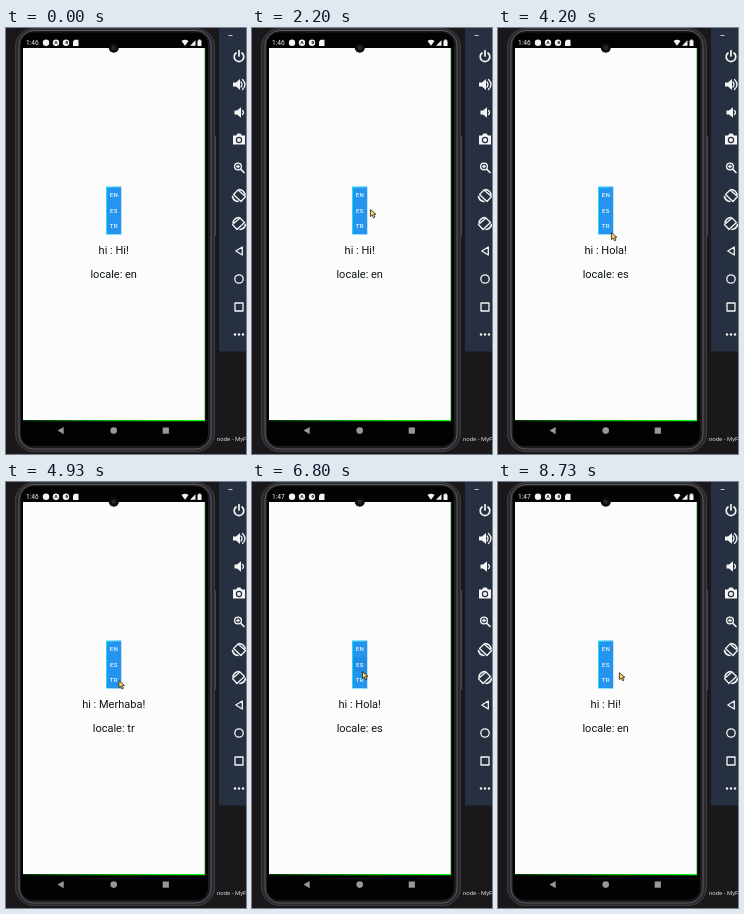
These frames come from a looping animation (240 px wide and 426 px high, 8790 ms). An HTML page:

```html
<!DOCTYPE html>
<html lang="en">
<head>
<meta charset="utf-8">
<title>Locale switcher</title>
<style>
  html, body { margin: 0; width: 100%; height: 100%; overflow: hidden; background: #1a181a; }
  svg { display: block; width: 100%; height: 100%; font-family: Roboto, sans-serif; }
  .line { fill: none; stroke: #f4f4f4; stroke-width: 1.3; stroke-linejoin: round; stroke-linecap: round; }
  .bold { stroke-width: 1.7; }
  .solid { fill: #f4f4f4; }
  .label { font-size: 11px; text-anchor: middle; fill: #0c160c; }
  .button { font-size: 6.2px; font-weight: 500; letter-spacing: .3px; text-anchor: middle; fill: #e4f4ff; }
</style>
</head>
<body>
<svg viewBox="0 0 240 426">
  <defs>
    <linearGradient id="green">
      <stop offset="0" stop-color="#063006"/>
      <stop offset=".5" stop-color="#08b008"/>
      <stop offset="1" stop-color="#08f808"/>
    </linearGradient>
    <linearGradient id="cyan">
      <stop offset="0" stop-color="#22dcf4"/>
      <stop offset="1" stop-color="#3aa6f0"/>
    </linearGradient>
  </defs>
  <rect width="240" height="426" fill="#1a181a"/>

  <!-- phone -->
  <path d="M209.500 108v100" stroke="#44444a"/>
  <rect x="9.500" y=".5" width="199" height="423" rx="18" fill="#2a2a2d" stroke="#3d3d43"/>
  <rect x="13" y="2.500" width="192" height="418.500" rx="15" fill="#1c1c1f" stroke="#5c5c65"/>
  <rect x="15" y="4.500" width="187" height="413.500" rx="12" fill="#020202"/>
  <rect x="17" y="20" width="182" height="372" fill="#fcfcfd"/>
  <rect x="17" y="392" width="182" height="1.300" fill="url(#green)"/>
  <rect x="198.500" y="20" width=".7" height="372" fill="#52b452"/>
  <circle cx="107.800" cy="19.700" r="5" fill="#0b0c0e"/>
  <circle cx="107.800" cy="19.700" r="2.200" fill="#202832"/>

  <!-- status bar -->
  <text id="clock" x="20" y="17.300" font-size="6.600" fill="#f4f4f4"></text>
  <g class="solid">
    <circle cx="40" cy="14.800" r="3.200"/>
    <circle cx="50" cy="14.800" r="3.200"/>
    <circle cx="60" cy="14.800" r="3.200"/>
    <path d="M67 13.500l1.500-1.800h4v6.200H67z"/>
    <path d="M175.500 13q3.500-2.600 7 0l-3.500 4.800z"/>
    <path d="M184 17.800l5.500-5.500v5.500z"/>
    <path d="M191.500 12.400h1v-.8h2v.8h1v5.600h-4z"/>
  </g>
  <path d="M48.700 16.100l1.300-3 1.300 3M60 13.600h1.500v1.800h-1.500z" fill="none" stroke="#111" stroke-width=".8"/>

  <!-- navigation bar -->
  <g fill="#98989a">
    <path d="M57.700 399v7.200l-6.200-3.600z"/>
    <circle cx="107.700" cy="402.600" r="3.300"/>
    <rect x="156.700" y="399.500" width="6.200" height="6.200"/>
  </g>

  <!-- app -->
  <rect x="100" y="158.500" width="15.300" height="48" fill="url(#cyan)"/>
  <rect x="101" y="160" width="14" height="46" fill="#2594ee"/>
  <rect id="ripple" x="101" width="14" height="15.500" fill="#0867bd"/>
  <g class="button">
    <text x="107.900" y="169.300">EN</text>
    <text x="107.900" y="184.900">ES</text>
    <text x="107.900" y="200.400">TR</text>
  </g>
  <text class="label" id="greeting" x="107.700" y="226.300"></text>
  <text class="label" id="locale" x="107.700" y="249.700"></text>

  <!-- emulator toolbar -->
  <rect x="213" width="27" height="323.500" fill="#263040"/>
  <path d="M222.500 7.500h4" stroke="#c5c8d0"/>
  <g class="line" transform="translate(233 0)">
    <path class="bold" d="M-3 25a4.800 4.800 0 1 0 6 0M0 22.500v5.500"/>
    <path d="M2 54q2 2.500 0 5M3.500 51.500q5 5 0 10M3.500 82.500q2 2 0 4"/>
    <circle cx="-1" cy="138.500" r="3.400"/>
    <path class="bold" d="M2 141.500l3 3"/>
    <path d="M-2.300 138.500h2.600M-1 137.200v2.600"/>
    <g id="rotate">
      <path d="M-5.500 166.500l4.500-4.500 7.500 6.500-4.500 5z"/>
      <path class="bold" d="M0 161.500q5 .5 6 5M-1 173.500q-4.500-.5-5.500-5"/>
    </g>
    <use href="#rotate" transform="translate(0 28) scale(-1 1)"/>
    <path d="M3.300 219v8l-6.500-4z"/>
    <circle cy="251" r="4.200"/>
    <rect x="-4" y="275" width="8" height="8"/>
  </g>
  <g class="solid" transform="translate(233 0)">
    <path d="M-6 54.500h3l4-3.500v11l-4-3.500h-3zM-4.500 82.500h2.500l4-3.300v10.600l-4-3.300h-2.500z"/>
    <path d="M-6 107.500h3l1.500-2h3l1.500 2h3v9H-6z"/>
    <circle cx="-4" cy="306.500" r="1.200"/>
    <circle cy="306.500" r="1.200"/>
    <circle cx="4" cy="306.500" r="1.200"/>
  </g>
  <circle cx="233" cy="112" r="2.600" fill="#f4f4f4" stroke="#263040" stroke-width="1.200"/>
  <text x="211" y="412.700" font-size="6" fill="#d2d2d6">node - MyPr</text>

  <path id="cursor" d="M.4 .6v7l1.800-1.500 1.300 2.700 1.500-.7-1.300-2.600 2.200-.2z"
        fill="#fad060" stroke="#29251b" stroke-width=".8" stroke-linejoin="round"/>
</svg>
<script>
  const LOOP = 8790;
  const CLOCK_CHANGE = 6250;
  const RIPPLE_TIME = 420;
  const greetings = { en: "Hi!", es: "Hola!", tr: "Merhaba!" };
  const buttonTops = { en: 159.5, es: 175, tr: 190.5 };
  const clicks = [[2700, "es"], [4450, "tr"], [6500, "es"], [7750, "en"]];
  // time, x, y
  const path = [
    [650, 198, 128], [1000, 143, 149], [1700, 118, 181], [2200, 118, 181],
    [2600, 111, 183], [3100, 111, 183], [3900, 113, 204], [4700, 113, 204],
    [5400, 111, 181], [5900, 111, 181], [6400, 110, 189], [6850, 110, 189],
    [7500, 111, 168], [7950, 111, 168], [8600, 121, 190], [LOOP, 121, 190]
  ];
  const byId = id => document.getElementById(id);
  const ease = p => p * p * (3 - 2 * p);

  function cursorAt(time) {
    const next = path.findIndex(point => point[0] > time);
    const [t0, x0, y0] = path[next - 1];
    const [t1, x1, y1] = path[next];
    const p = ease((time - t0) / (t1 - t0));
    return [x0 + (x1 - x0) * p, y0 + (y1 - y0) * p];
  }

  function draw(time) {
    const [clickTime, locale] = clicks.filter(click => click[0] <= time).pop() || [-LOOP, "en"];
    byId("greeting").textContent = "hi : " + greetings[locale];
    byId("locale").textContent = "locale: " + locale;
    byId("clock").textContent = time < CLOCK_CHANGE ? "1:46" : "1:47";

    const ripple = byId("ripple");
    ripple.setAttribute("y", buttonTops[locale]);
    ripple.setAttribute("opacity", Math.max(0, 1 - (time - clickTime) / RIPPLE_TIME) * .6);

    const cursor = byId("cursor");
    const visible = time >= path[0][0];
    cursor.setAttribute("visibility", visible ? "visible" : "hidden");
    if (visible) cursor.setAttribute("transform", `translate(${cursorAt(time)})`);
  }

  const start = performance.now();
  function tick() {
    draw((performance.now() - start) % LOOP);
    requestAnimationFrame(tick);
  }
  tick();
</script>
</body>
</html>
```
